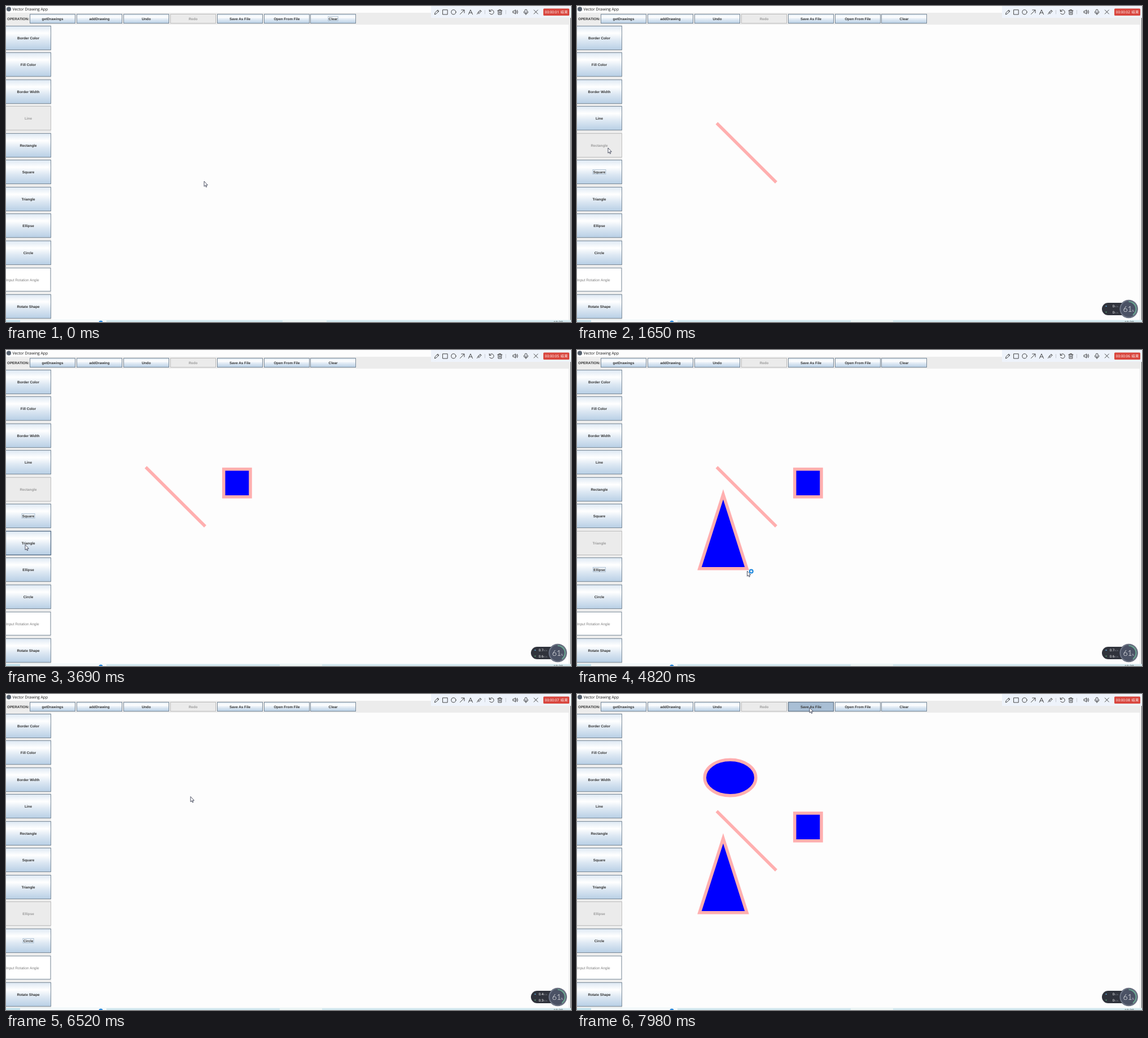
These frames come from a looping animation (1001x559 px, 8000 ms). An HTML page:

```html
<!DOCTYPE html>
<html lang="en">
<head>
<meta charset="utf-8">
<title>Vector Drawing App</title>
<style>
  html, body { margin: 0; width: 100%; height: 100%; overflow: hidden; background: #fdfdfd; }
  svg { display: block; width: 1001px; height: 559px; }
  text { text-rendering: geometricPrecision; }
  .ui { font: bold 6.3px "Liberation Sans", Arial, sans-serif; fill: #333; }
  .btn rect { fill: url(#metal); stroke: #7a8a99; stroke-width: 1; }
  .btn text { text-anchor: middle; }
  .btn .focus { fill: none; stroke: #a3b8cc; stroke-width: .8; visibility: hidden; }
  .btn.focused .focus { visibility: visible; }
  .btn.hover .face { stroke: #536b85; stroke-width: 1.3; }
  .btn.pressed .face { fill: #a9bfd5; stroke: #65788c; }
  .btn.disabled .face { fill: #ebebeb; stroke: #bdbdbd; }
  .btn.disabled text { fill: #9b9b9b; }
  .icons { fill: none; stroke: #333; stroke-width: .9; stroke-linecap: round; stroke-linejoin: round; }
  .shape { fill: #00f; stroke: #ffafaf; stroke-width: 5.5; }
  .timer { font: 6.3px "Noto Sans", "Noto Sans CJK SC", sans-serif; fill: #fff; }
  .speed { font: 6px Roboto, sans-serif; fill: #fff; text-anchor: end; }
  .unit { font: 4.2px Roboto, sans-serif; fill: #878b96; }
</style>
</head>
<body>
<svg viewBox="0 0 1001 559">
  <defs>
    <linearGradient id="metal" x2="0" y2="1">
      <stop offset="0" stop-color="#dde8f3"/>
      <stop offset=".3" stop-color="#fff"/>
      <stop offset=".6" stop-color="#dde8f3"/>
      <stop offset="1" stop-color="#b8cfe5"/>
    </linearGradient>
  </defs>

  <rect width="1001" height="559" fill="#fdfdfd"/>
  <path d="M0 12H1001V33H80V556H0ZM997 33H1000V556H997Z" fill="#ececec"/>
  <circle cx="5" cy="5.5" r="4" fill="#56616e"/>
  <text x="11.5" y="8.3" font-family="Open Sans, sans-serif" font-size="6.8" fill="#111">Vector Drawing App</text>
  <text class="ui" x="2" y="25">OPERATION:</text>
  <g id="buttons" class="ui"></g>
  <rect x="-1" y="463.5" width="80" height="41" fill="#fff" stroke="#7a8a99"/>
  <text x="0" y="486.7" font-family="Liberation Sans, Arial, sans-serif" font-size="6.5" fill="#808080">Input Rotation Angle</text>

  <g id="shapes">
    <path id="line" class="shape" stroke-linecap="square" d="M249.5 209.2 351 310"/>
    <rect id="rect" class="shape" x="385.7" y="210.8" width="47.3" height="49"/>
    <path id="tri" class="shape" d="M259 255.3 301 386.8H217Z"/>
    <ellipse id="oval" class="shape" cx="271.5" cy="148" rx="45.3" ry="31.8"/>
  </g>

  <rect x="753" width="248" height="21" fill="#eef3fb"/>
  <g class="icons">
    <path d="M759.5 14.5 760.2 11.8 765 7 767 9 762.2 13.8ZM763.8 8.2 765.8 10.2"/>
    <path d="M774 6.8H782.2V15H774Z"/>
    <circle cx="793" cy="10.8" r="4.1"/>
    <path d="M804.5 14.5 811.8 7.2M806.8 7H812V12.2"/>
    <path d="M819.4 14.8 823 6.8 826.6 14.8M820.7 12H825.3"/>
    <path d="M834.3 14.5 838.6 10.2 M836 11.5 839.5 8 841.5 10 838 13.5ZM840 7.2 842.2 9.4"/>
    <path d="M848.5 7.5V14M885.5 7.5V14" stroke="#c3c8d0"/>
    <path d="M856.3 6.5V9.5H859.3M856.5 9.3A4 4 0 1 1 856.7 12.8"/>
    <path d="M870.8 8.2H879M873.3 8V6.6H876.5V8M872 8.2V15H877.8V8.2M874 10.2V13M875.9 10.2V13"/>
    <path d="M898.4 9H900.2L902.5 6.8V14.2L900.2 12H898.4ZM904.2 8.8Q905.6 10.5 904.2 12.2M905.6 7.3Q908 10.5 905.6 13.7"/>
    <path d="M919.2 8A1.9 1.9 0 0 1 923 8V10.5A1.9 1.9 0 0 1 919.2 10.5ZM917.3 10A3.8 3.8 0 0 0 924.9 10M921.1 13.9V15.5"/>
    <path d="M935.3 7 942.3 14M942.3 7 935.3 14"/>
  </g>
  <rect x="952" y="4.5" width="46" height="12.5" rx="1.5" fill="#d9473f"/>
  <text id="timer" class="timer" x="954.8" y="13.1"></text>
  <text class="timer" x="982.6" y="13.1">结束</text>
  <path d="M1000.5 21V556" stroke="#5d6268"/>

  <rect y="555.5" width="1001" height="4" fill="#d3e9ef"/>
  <rect y="555.5" width="25" height="4" fill="#c5e3ed"/>
  <rect x="25" y="556" width="153" height="4" fill="#f8fbfc"/>
  <rect id="task" y="556" height="4" fill="#eef6f5"/>
  <circle cx="168" cy="560" r="3.6" fill="#2787dc"/>
  <text x="970" y="562" font-family="Open Sans, sans-serif" font-size="6.5" fill="#333">10:20</text>

  <g id="meter">
    <rect x="930" y="525" width="48" height="22" rx="11" fill="#30333c"/>
    <path d="M936 531.8 937.5 529.6 939 531.8Z" fill="#5cacdf"/>
    <path d="M936 540.8 937.5 543 939 540.8Z" fill="#58a774"/>
    <text id="up" class="speed" x="952" y="532.7"></text>
    <text id="down" class="speed" x="952" y="544.2"></text>
    <text class="unit" x="952.3" y="532.7">K/s</text>
    <text class="unit" x="952.3" y="544.2">K/s</text>
    <circle cx="977.5" cy="536" r="16.3" fill="#4b5265"/>
    <circle cx="977.5" cy="536" r="15" fill="none" stroke="#737a8a" stroke-width="1.6"/>
    <path d="M977.5 523A13 13 0 0 1 985 546.6" fill="none" stroke="#70b99a" stroke-width="1.6"/>
    <text x="967.5" y="540.8" font-family="Lato, sans-serif" font-size="14" font-weight="300" fill="#fff">61</text>
    <text x="983" y="541" font-family="Lato, sans-serif" font-size="5" fill="#ccd0d8">%</text>
  </g>

  <g id="cursor">
    <path d="M0 0V9.2L2.1 7.3 3.4 10.4 4.8 9.8 3.5 6.8H6.3Z" fill="#fff" stroke="#252a40" stroke-width=".8"/>
    <circle id="busy" cx="7.2" cy=".6" r="3" fill="#d8ecfb" stroke="#1c86dc" stroke-width="2"/>
  </g>
</svg>
<script>
const $ = id => document.getElementById(id);
const LOOP = 8000;
const buttons = {};

function addButton(name, x, y, w, h) {
  const g = document.createElementNS('http://www.w3.org/2000/svg', 'g');
  const cx = x + w / 2, cy = y + h / 2;
  g.innerHTML = `<rect class="face" x="${x}" y="${y}" width="${w}" height="${h}"/>
    <text x="${cx}" y="${cy + 2.3}">${name}</text><rect class="focus"/>`;
  $('buttons').append(g);
  const half = g.querySelector('text').getComputedTextLength() / 2 + .8;
  const set = (k, v) => g.lastElementChild.setAttribute(k, v);
  set('x', cx - half);
  set('y', cy - 4);
  set('width', half * 2);
  set('height', 8);
  buttons[name] = { g, x, y, w, h };
}

['getDrawings', 'addDrawing', 'Undo', 'Redo', 'Save As File', 'Open From File', 'Clear']
  .forEach((name, i) => addButton(name, Math.round(42 + 82.9 * i) + .5, 14.5, 80, 16));
['Border Color', 'Fill Color', 'Border Width', 'Line', 'Rectangle', 'Square', 'Triangle',
  'Ellipse', 'Circle', '', 'Rotate Shape'].forEach((name, i) => {
  if (name) addButton(name, -.5, Math.round(35.55 + 47.53 * i) - .5, 80, 42);
});

// Pointer tip: time, x, y
const path = [
  [0, 351, 310], [520, 351, 310], [1180, 55, 251], [1680, 55, 251], [2080, 386, 211],
  [2130, 386, 211], [2460, 433, 260], [2600, 433, 260], [3350, 34, 344.5], [3780, 34, 344.5],
  [4130, 217, 255], [4170, 217, 255], [4490, 301.5, 391], [4920, 301.5, 391], [5340, 54, 387],
  [5390, 52.5, 386], [5800, 52.5, 386], [6190, 226, 116], [6240, 226, 116], [6520, 327, 181.5],
  [6700, 317, 180], [6940, 317, 180], [7700, 414, 26], [7800, 412, 24], [LOOP, 412, 24]
];
// Stepped values: start time, value
const tool = [[0, 'Line'], [1320, 'Rectangle'], [3780, 'Triangle'], [5430, 'Ellipse']];
const focus = [[0, 'Clear'], [1320, 'Square'], [3780, 'Ellipse'], [5430, 'Circle'], [7850, 'Save As File']];
const second = [[0, 1], [900, 2], [2180, 3], [2750, 4], [3250, 5], [4200, 6], [6000, 7], [7100, 8]];
const up = [[0, '0'], [2900, '0.7'], [5950, '0.4'], [7850, '0']];
const down = [[0, '0'], [2900, '0.6'], [5950, '0.3'], [7300, '0']];
const born = { line: 100, rect: 2430, tri: 4470, oval: 6690 };
// The canvas is blank while a shape is dragged out
const drags = [[2150, 2430], [4190, 4470], [6270, 6690]];

const step = (list, t) => list.findLast(s => s[0] <= t)[1];
const within = (t, [a, b]) => t >= a && t < b;
const show = (id, on) => $(id).setAttribute('visibility', on ? 'inherit' : 'hidden');

function pointer(t) {
  const i = path.findLastIndex(p => p[0] <= t);
  const a = path[i], b = path[i + 1];
  const u = (t - a[0]) / (b[0] - a[0]), e = u * u * (3 - 2 * u);
  return [a[1] + (b[1] - a[1]) * e, a[2] + (b[2] - a[2]) * e];
}

function draw() {
  const t = performance.now() % LOOP;
  const [x, y] = pointer(t);
  $('cursor').setAttribute('transform', `translate(${x} ${y})`);
  show('busy', within(t, [4500, 4950]));

  const off = step(tool, t), on = step(focus, t);
  for (const [name, b] of Object.entries(buttons)) {
    const over = x >= b.x && x < b.x + b.w && y >= b.y && y < b.y + b.h;
    const disabled = name === off || name === 'Redo';
    const list = b.g.classList;
    list.add('btn');
    list.toggle('disabled', disabled);
    list.toggle('focused', name === on);
    list.toggle('hover', over && !disabled);
    list.toggle('pressed', name === 'Save As File' && t >= 7850);
  }

  show('shapes', !drags.some(d => within(t, d)));
  for (const id in born) show(id, t >= born[id]);

  $('timer').textContent = '00:00:0' + step(second, t);
  $('up').textContent = step(up, t);
  $('down').textContent = step(down, t);
  show('meter', t >= 150);
  $('task').setAttribute('x', t < 150 ? 490 : 485);
  $('task').setAttribute('width', t < 150 ? 78 : 75);
  requestAnimationFrame(draw);
}
draw();
</script>
</body>
</html>
```
